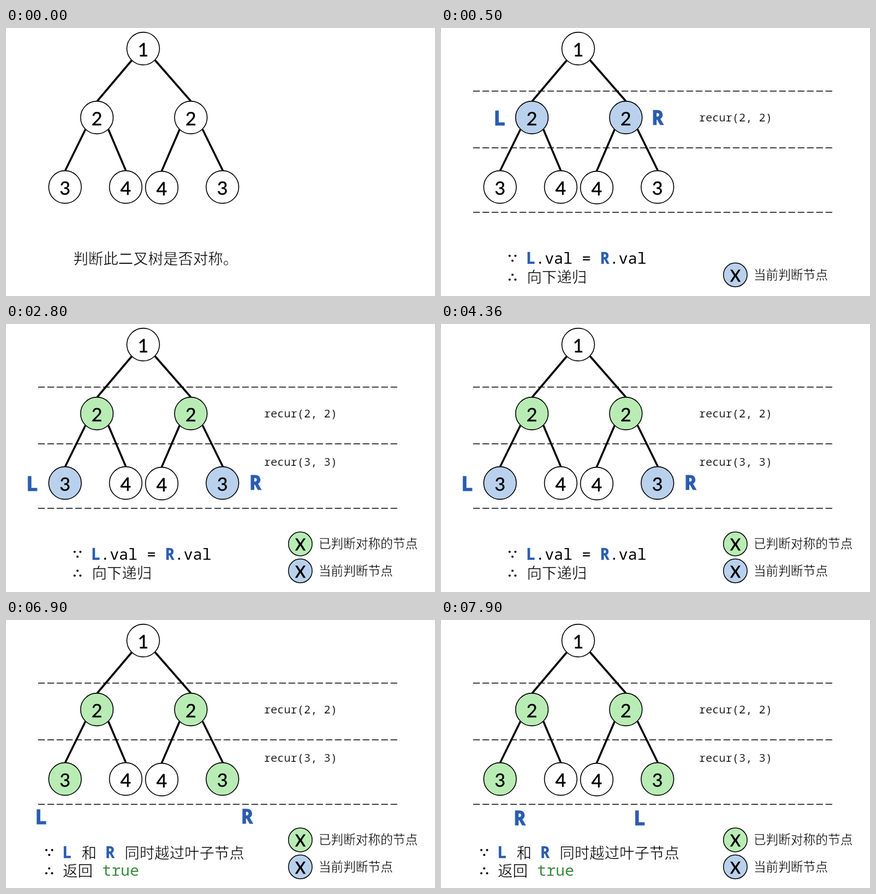
Recreate the animation shown at these times as an HTML page. Size 774 by 482 pixels, loop 8 s.

```html
<!DOCTYPE html>
<html lang="zh-CN">
<head>
<meta charset="utf-8">
<title>对称二叉树</title>
<style>
html, body { margin: 0; width: 100%; height: 100%; overflow: hidden; background: #fff; }
svg { display: block; width: 774px; height: 482px; }

.edge { stroke: #000; stroke-width: 3.5; stroke-linecap: round; }
.rule { stroke: #000; stroke-width: 1.35; stroke-dasharray: 12.1 4.63; }
.node circle { fill: #fff; stroke: #000; stroke-width: 1.6; }
.node text, .key text { font-family: Lato, sans-serif; text-anchor: middle; stroke: #000; }
.node text { font-size: 33.5px; stroke-width: .4; }
.key circle { stroke: #000; stroke-width: 1.5; }
.key text { font-size: 28px; stroke-width: .9; }
/* a white outline thins the strokes */
.cjk { font: 300 27px "Noto Sans CJK SC", "Noto Sans CJK", sans-serif; stroke: #fff; stroke-width: .5; }
.small { font-size: 22.35px; stroke-width: .4; }
.mono { font: 27.8px "Noto Sans Mono", monospace; }
.call { font-size: 20px; stroke: #fff; stroke-width: .25; }
.ptr, .v { font-weight: 700; fill: #2a5db0; stroke: #2a5db0; }
.v { stroke-width: .5; }
.ptr { font-family: "Noto Sans Mono", monospace; font-size: 36px; stroke-width: 1.2; text-anchor: middle; }
.ok { fill: #3a8a3e; }

/* hard cuts at 500, 2800, 5400 and 7900 ms */
.start, .calls, .same, .top, .low, .leaf, .past, .swap, .done { animation: 8s step-end infinite; }
.start { animation-name: start; }
.calls { animation-name: calls; }
.same { animation-name: same; }
.top { animation-name: top; }
.low { animation-name: low; }
.done { animation-name: done; }
.leaf { animation-name: leaf; }
.past { animation-name: past; }
.swap { animation-name: swap; }
@keyframes start { 0% { opacity: 1 } 6.25%, 100% { opacity: 0 } }
@keyframes calls { 0% { opacity: 0 } 6.25%, 100% { opacity: 1 } }
@keyframes same { 0% { opacity: 0 } 6.25% { opacity: 1 } 67.5%, 100% { opacity: 0 } }
@keyframes top { 0% { opacity: 0 } 6.25% { opacity: 1 } 35%, 100% { opacity: 0 } }
@keyframes low { 0% { opacity: 0 } 35%, 100% { opacity: 1 } }
@keyframes leaf { 0% { opacity: 0 } 35% { opacity: 1 } 67.5%, 100% { opacity: 0 } }
@keyframes done { 0% { opacity: 0 } 67.5%, 100% { opacity: 1 } }
@keyframes past { 0% { opacity: 0 } 67.5% { opacity: 1 } 98.75%, 100% { opacity: 0 } }
@keyframes swap { 0% { opacity: 0 } 98.75%, 100% { opacity: 1 } }

.two circle { animation: two 8s step-end infinite; }
.three circle { animation: three 8s step-end infinite; }
@keyframes two { 0% { fill: #fff } 6.25% { fill: #b9d1ec } 35%, 100% { fill: #b9ecb5 } }
@keyframes three { 0% { fill: #fff } 35% { fill: #b9d1ec } 67.5%, 100% { fill: #b9ecb5 } }
</style>
</head>
<body>
<svg viewBox="0 0 774 482">
  <defs>
    <g id="because">
      <circle cx="-5.2" cy="-4.2" r="2"/><circle cx="5.2" cy="-4.2" r="2"/><circle cy="4.4" r="2"/>
    </g>
    <g id="therefore">
      <circle cy="-4.2" r="2"/><circle cx="-5.2" cy="4.4" r="2"/><circle cx="5.2" cy="4.4" r="2"/>
    </g>
  </defs>

  <g class="edge">
    <path d="M227 58L165 131M269 58L333 131M143 183L107 256M185 183L216 256M313 183L281 257M355 183L391 256"/>
  </g>
  <g class="calls">
    <path class="rule" d="M58 113.5H706M58 215.5H706M58 331.5H706"/>
    <text class="mono call" x="465.5" y="168">recur(2, 2)</text>
  </g>

  <g class="node" transform="translate(247.5 37)"><circle r="29.4"/><text y="13.5">1</text></g>
  <g class="node two" transform="translate(164 161)"><circle r="29.4"/><text y="13.5">2</text></g>
  <g class="node two" transform="translate(333.5 161)"><circle r="29.4"/><text y="13.5">2</text></g>
  <g class="node three" transform="translate(106.5 286)"><circle r="29.4"/><text y="13.5">3</text></g>
  <g class="node" transform="translate(216 286)"><circle r="29.4"/><text y="13.5">4</text></g>
  <g class="node" transform="translate(281 287)"><circle r="29.4"/><text y="13.5">4</text></g>
  <g class="node three" transform="translate(390.5 286)"><circle r="29.4"/><text y="13.5">3</text></g>

  <text class="cjk start" x="121.5" y="425">判断此二叉树是否对称。</text>

  <g class="calls">
    <g class="key" transform="translate(531 444)"><circle r="21.4" fill="#b9d1ec"/><text y="11.5">X</text></g>
    <text class="cjk small" x="564" y="451.5">当前判断节点</text>
  </g>
  <g class="low">
    <text class="mono call" x="465.5" y="254.5">recur(3, 3)</text>
    <g class="key" transform="translate(531 395.5)"><circle r="21.4" fill="#b9ecb5"/><text y="11.5">X</text></g>
    <text class="cjk small" x="564" y="403">已判断对称的节点</text>
  </g>

  <g class="same">
    <use href="#because" x="129" y="414"/>
    <text class="mono" x="153.8" y="424"><tspan class="v">L</tspan>.val = <tspan class="v">R</tspan>.val</text>
    <use href="#therefore" x="129" y="448"/>
    <text class="cjk" x="155" y="457.5">向下递归</text>
  </g>
  <g class="done">
    <use href="#because" x="78" y="418"/>
    <text class="mono v" x="102" y="428">L</text>
    <text class="cjk" x="136.5" y="428.5">和</text>
    <text class="mono v" x="179.5" y="428">R</text>
    <text class="cjk" x="214" y="428.5">同时越过叶子节点</text>
    <use href="#therefore" x="78" y="451"/>
    <text class="cjk" x="102.5" y="460.5">返回</text>
    <text class="mono ok" x="173.5" y="460">true</text>
  </g>

  <g class="ptr">
    <g class="top"><text x="106" y="174.5">L</text><text x="391" y="174">R</text></g>
    <g class="leaf"><text x="47.5" y="300">L</text><text x="450" y="297.5">R</text></g>
    <g class="past"><text x="63.5" y="366.5">L</text><text x="435" y="366">R</text></g>
    <g class="swap"><text x="358.5" y="368.5">L</text><text x="142" y="368.5">R</text></g>
  </g>
</svg>
</body>
</html>
```
